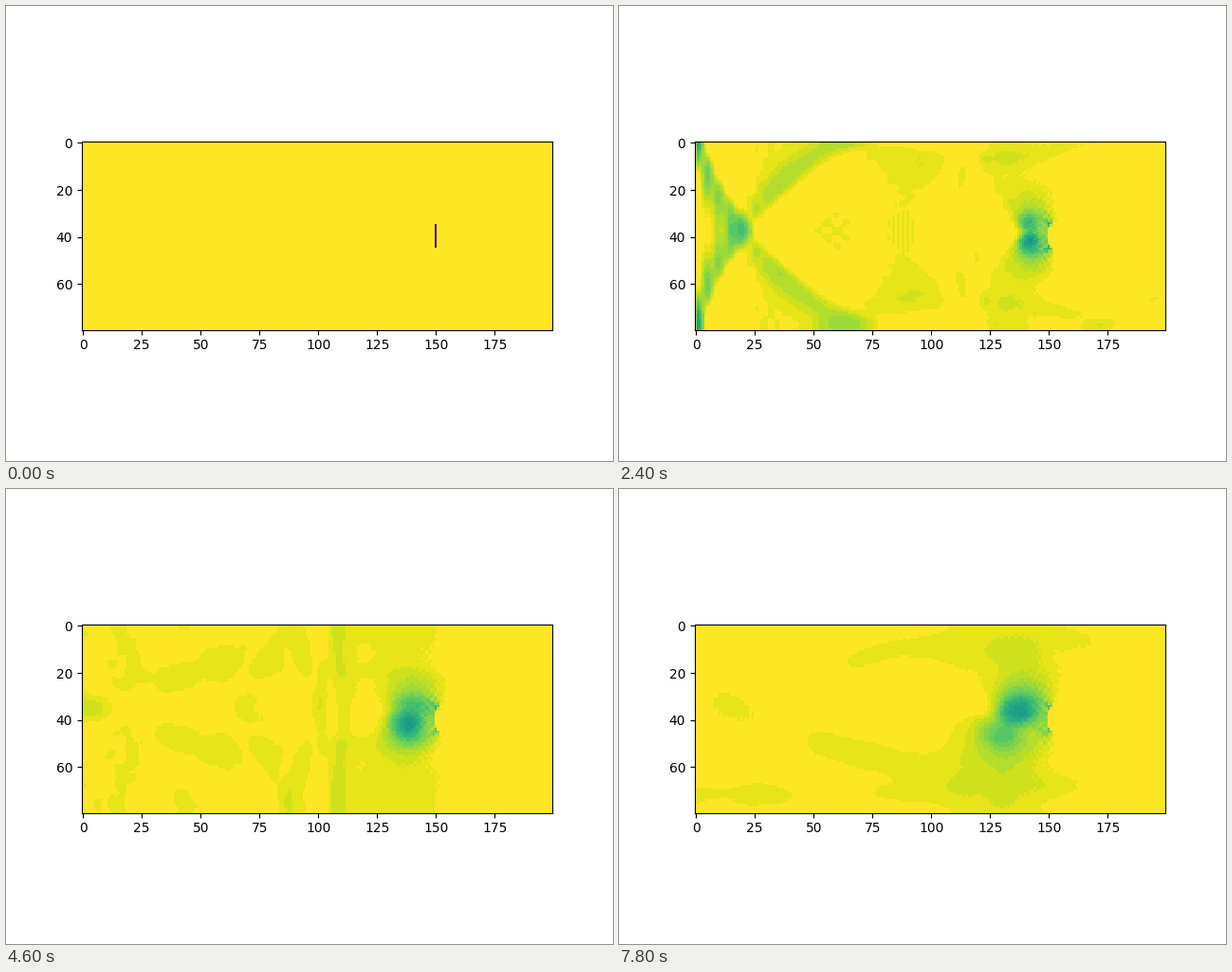
These frames come from a looping animation (640 px wide and 480 px high, 8000 ms). A matplotlib script:

```python
import numpy as np
import matplotlib.pyplot as plt
from matplotlib.animation import FuncAnimation

# Lattice Boltzmann (D2Q9) flow to the left past a short vertical plate.
HEIGHT, WIDTH = 80, 200
FRAMES, STEPS = 40, 20
VISCOSITY = 0.005
OMEGA = 1 / (3 * VISCOSITY + 0.5)
SPEED = -0.1
TILT = -0.01
LEVELS = 28

EX = np.array([0, 0, 0, 1, -1, 1, 1, -1, -1])
EY = np.array([0, 1, -1, 0, 0, 1, -1, 1, -1])
OPPOSITE = [0, 2, 1, 4, 3, 8, 7, 6, 5]
WEIGHT = np.array([4 / 9] + [1 / 9] * 4 + [1 / 36] * 4)

wall = np.zeros((HEIGHT, WIDTH), bool)
wall[35:45, 150] = True


def shift(a, i):
    return np.roll(a, (EY[i], EX[i]), axis=(0, 1))


beside_wall = [shift(wall, i) for i in range(9)]


def equilibrium(rho, ux, uy):
    base = 1 - 1.5 * (ux * ux + uy * uy)
    out = np.empty((9,) + np.shape(rho))
    for i in range(9):
        cu = 3 * (EX[i] * ux + EY[i] * uy)
        out[i] = WEIGHT[i] * rho * (base + cu + 0.5 * cu * cu)
    return out


def stream(f):
    for i in range(1, 9):
        f[i] = shift(f[i], i)
    hits = [f[i][wall] for i in range(9)]
    for i in range(1, 9):
        f[i][beside_wall[i]] = hits[OPPOSITE[i]]


def collide(f, inflow):
    rho = f.sum(axis=0)
    ux = f[3] - f[4] + f[5] + f[6] - f[7] - f[8]
    uy = f[1] - f[2] + f[5] - f[6] + f[7] - f[8]
    ux = np.clip(ux / rho, -0.3, 0.3)
    uy = np.clip(uy / rho, -0.3, 0.3)
    f += OMEGA * (equilibrium(rho, ux, uy) - f)
    f[:, :, 0] = inflow
    return rho


def simulate():
    ones = np.ones((HEIGHT, WIDTH))
    f = equilibrium(ones, SPEED * ones, TILT * ones)
    inflow = equilibrium(np.ones(HEIGHT), SPEED, 0.0)
    fields = [ones]
    for _ in range(FRAMES - 1):
        for _ in range(STEPS):
            stream(f)
            rho = collide(f, inflow)
        fields.append(rho)
    return fields


fields = simulate()

# The colour range follows the depth of the first wavefront.
front = fields[8][30:46, 38:54]
span = max(1 - front.min(), 0.005) / 0.29
half = span / (2 * (LEVELS - 1))
fields[0] = np.where(wall, 1 - span, 1.0)

fig, ax = plt.subplots(figsize=(6.4, 4.8), dpi=100)
image = ax.imshow(fields[0], cmap=plt.get_cmap("viridis", LEVELS),
                  vmin=1 - span - half, vmax=1 + half,
                  interpolation="nearest")


def update(k):
    image.set_data(fields[k])
    return (image,)


anim = FuncAnimation(fig, update, frames=FRAMES, interval=200,
                     repeat=True, repeat_delay=0)
plt.show()
```
